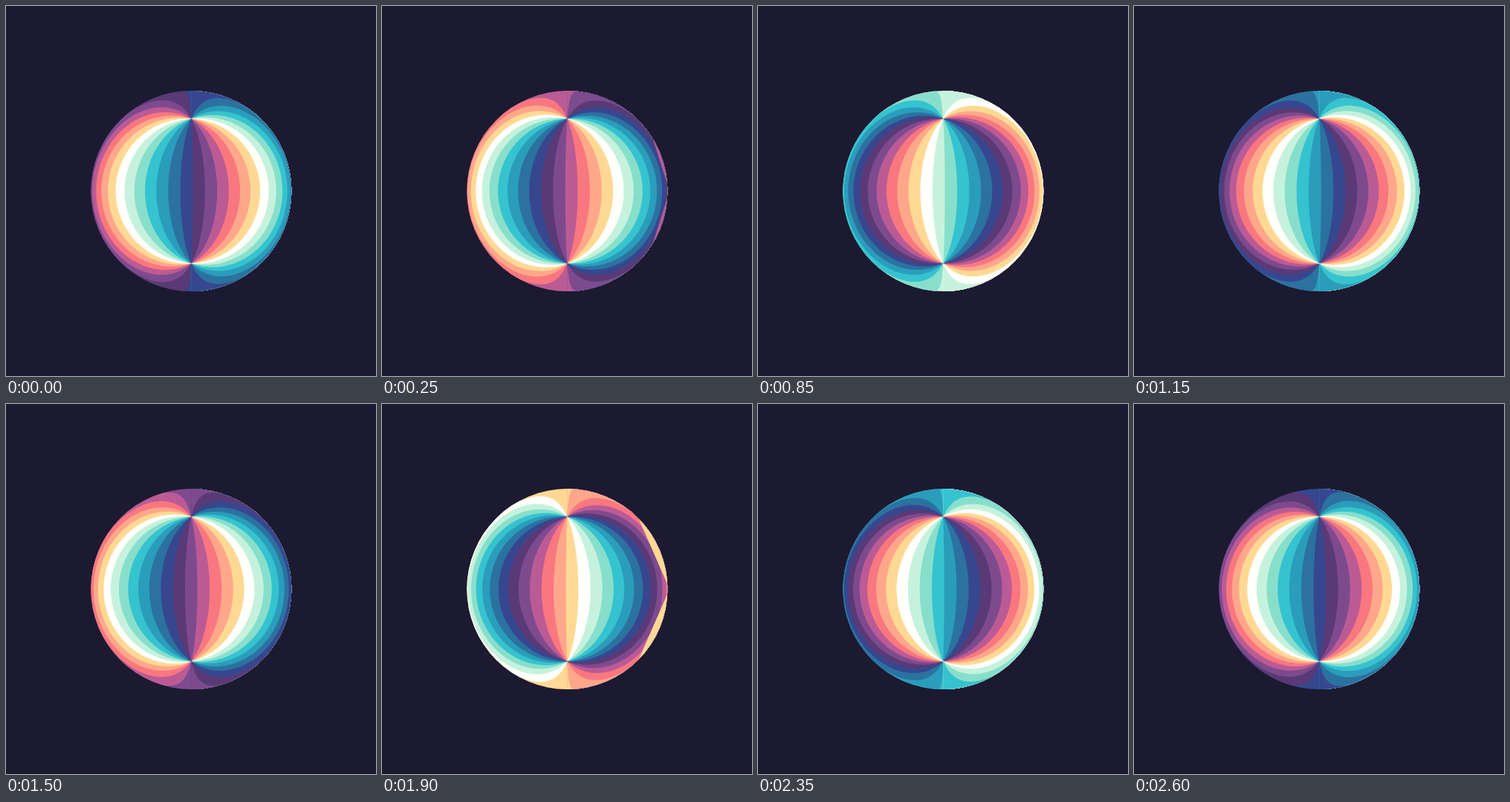
Animation of 498x498 px, one loop 2.65 s. Source, as an HTML page:

```html
<!DOCTYPE html>
<html lang="en">
<head>
<meta charset="utf-8">
<title>Striped globe</title>
<style>
  html, body { margin: 0; width: 100%; height: 100%; overflow: hidden; background: #1c1a30; }
  svg { display: block; width: 100vw; height: 100vh; }
</style>
</head>
<body>
<svg viewBox="0 0 498 498">
  <clipPath id="disc"><circle cx="249.3" cy="249.1" r="135"/></clipPath>
  <g id="globe" clip-path="url(#disc)"></g>
</svg>
<script>
const NS = 'http://www.w3.org/2000/svg';
const CX = 249.3, CY = 249.1;
const R = 137.7; // projected sphere, a little larger than the visible disc
const LOOP = 2650, TICK = 50;
const COLORS = ['#5a3a76', '#7e4a8e', '#bb5b95', '#f9777f', '#ffa78b', '#ffd994', '#fffffb',
  '#c6f2dd', '#87dfcb', '#35c3cf', '#2a9dbb', '#2b72a0', '#36478f'];
const N = COLORS.length;

// [time in ms, stripe number at the centre]
const KEYS = [[0, -0.12], [550, 4.88], [1150, 10.85], [1500, 14.5],
  [1900, 18.1], [2100, 20.38], [2600, 25.46], [LOOP, 25.88]];

const globe = document.getElementById('globe');
const add = (name, attrs) => {
  const el = document.createElementNS(NS, name);
  for (const k in attrs) el.setAttribute(k, attrs[k]);
  return globe.appendChild(el);
};
const base = add('circle', { cx: CX, cy: CY, r: R });
const layers = Array.from({ length: 2 * N }, () => add('path', {}));

// Lambert equal-area view of the whole sphere inside one disc
function project(lon, lat) {
  const c = Math.cos(lat);
  const k = R / Math.sqrt(2 * (1 + c * Math.cos(lon)));
  return (CX + k * c * Math.sin(lon)).toFixed(2) + ' ' + (CY - k * Math.sin(lat)).toFixed(2);
}

// Everything east of a meridian, up to the right rim
function eastOf(lon) {
  const steps = 120, pts = [];
  for (let i = 0; i <= steps; i++) pts.push(project(lon, Math.PI * (i / steps - 0.5)));
  return `M${pts.join('L')}L${CX} ${CY - R}A${R} ${R} 0 0 1 ${CX} ${CY + R}Z`;
}

function phaseAt(ms) {
  let i = 1;
  while (ms > KEYS[i][0]) i++;
  const [t0, p0] = KEYS[i - 1], [t1, p1] = KEYS[i];
  return p0 + (p1 - p0) * (ms - t0) / (t1 - t0);
}

const color = i => COLORS[((i % N) + N) % N];

function render(ms) {
  const phase = phaseAt(Math.floor((ms % LOOP) / TICK) * TICK);
  const first = Math.floor(phase - N);
  base.setAttribute('fill', color(first));
  layers.forEach((layer, i) => {
    const stripe = first + 1 + i;
    const lon = (stripe - phase) * Math.PI / N;
    layer.setAttribute('fill', color(stripe));
    layer.setAttribute('d', lon < Math.PI - 1e-4 ? eastOf(lon) : '');
  });
}

const start = performance.now();
function loop() {
  render(performance.now() - start);
  requestAnimationFrame(loop);
}
loop();
</script>
</body>
</html>
```
